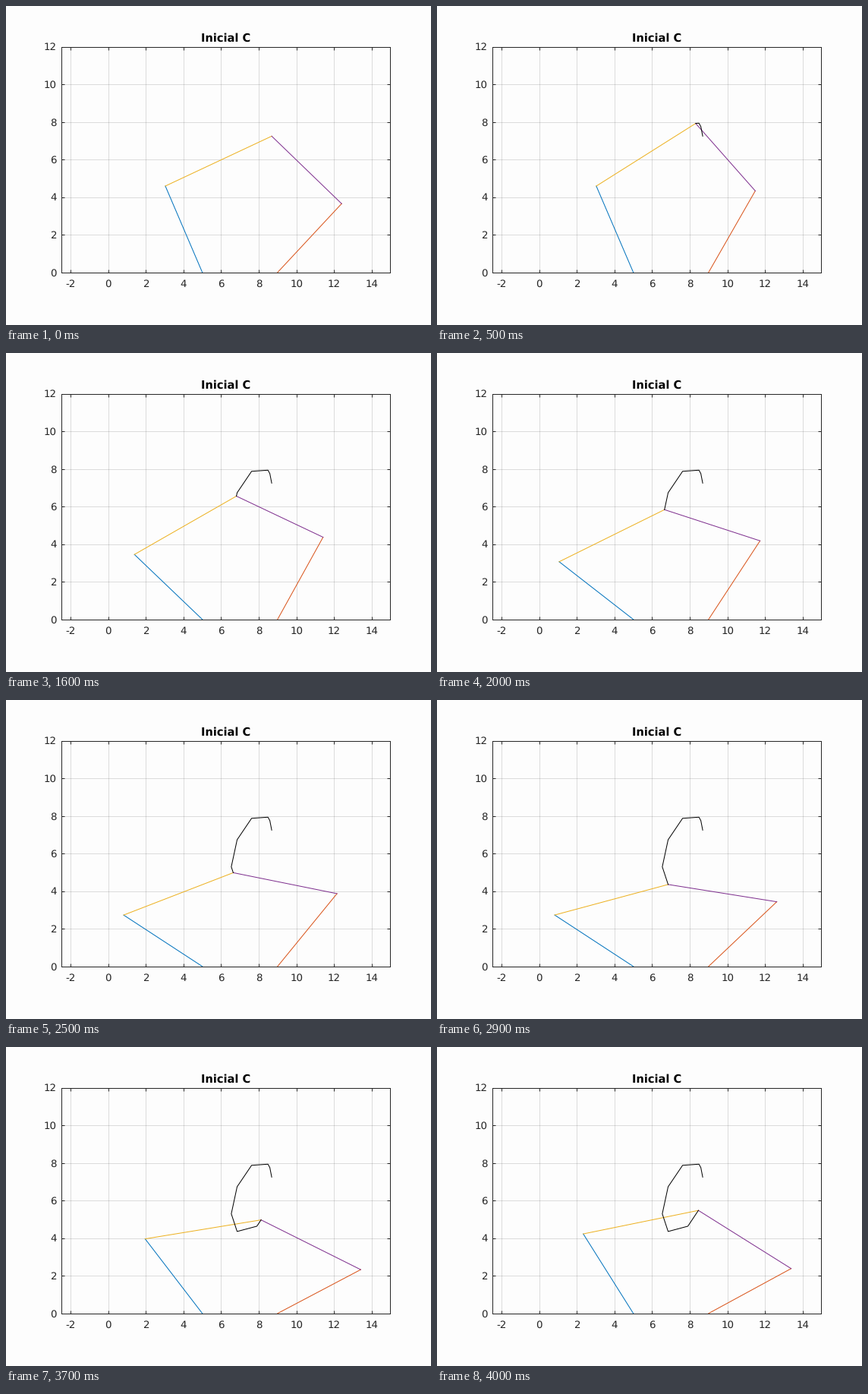
A matplotlib script that plays this animation: 560x420 px, repeating every 4.1 s.

```python
import numpy as np
import matplotlib.pyplot as plt
from matplotlib.animation import FuncAnimation

W, H, DPI = 560, 420, 100
LEFT, RIGHT, TOP, BOTTOM = 72.95, 506.4, 53.8, 350.8
PX = 72 / DPI  # one pixel in points
FRAMES, INTERVAL = 41, 100
INK = "#262626"
BACK = "#fdfdfd"

# Five-bar arm: two ground pivots and cranks of equal length
BASE_L, BASE_R = np.array([5.0, 0.0]), np.array([9.0, 0.0])
CRANK, COUPLER = 5.0, 6.25

# The right crank is steered by a slightly different virtual arm,
# so the right coupler stretches as the tip moves
STEER_BASE, STEER_CRANK, STEER_COUPLER = np.array([9.81, 0.0]), 3.53, 5.85

# Corners of the letter drawn by the tip: time step, x, y
PATH = np.array([
    (0, 8.69, 7.25), (3, 8.59, 7.76), (4, 8.49, 7.94),
    (9, 7.62, 7.88), (15, 6.85, 6.74), (23, 6.54, 5.30),
    (29, 6.85, 4.36), (35, 7.90, 4.64), (40, 8.46, 5.48),
])

plt.rcParams["font.family"] = "DejaVu Sans"
plt.rcParams["text.hinting"] = "none"
fig = plt.figure(figsize=(W / DPI, H / DPI), dpi=DPI, facecolor=BACK)
ax = fig.add_axes([LEFT / W, 1 - BOTTOM / H,
                   (RIGHT - LEFT) / W, (BOTTOM - TOP) / H], facecolor=BACK)
ax.set(xlim=(-2.5, 15), ylim=(0, 12),
       xticks=range(-2, 15, 2), yticks=range(0, 13, 2))
ax.tick_params(direction="in", length=4 * PX, width=PX, color=INK,
               top=True, right=True, labelbottom=False, labelleft=False)
ax.grid(color=INK, alpha=0.15, linewidth=PX)
ax.set_axisbelow(True)
for spine in ax.spines.values():
    spine.set(color=INK, linewidth=PX)


def label(x, y, text, size=13.33, **style):
    """Text with its baseline at a pixel position of the stage."""
    style = {"color": INK, "ha": "center", **style}
    fig.text(x / W, 1 - y / H, text, fontsize=size * PX,
             va="baseline", **style)


for v in range(-2, 15, 2):
    label(LEFT + (v + 2.5) / 17.5 * (RIGHT - LEFT), 370, str(v))
for v in range(0, 13, 2):
    y = BOTTOM - v / 12 * (BOTTOM - TOP)
    label(67, y + 4.6, str(v), ha="right")
label(290, 47, "Inicial C", 14.67, color="black", weight="bold")


def stroke(color):
    return ax.plot([], [], color=color, linewidth=PX)[0]


crank_l = stroke("#0072bd")
crank_r = stroke("#d95319")
coupler_l = stroke("#edb120")
coupler_r = stroke("#7e2f8e")
trace = stroke("black")


def tip_at(step):
    return np.array([np.interp(step, PATH[:, 0], PATH[:, k]) for k in (1, 2)])


def crank_angle(base, tip, crank, coupler, side):
    """Angle of a crank whose coupler reaches the tip (law of cosines)."""
    dx, dy = tip - base
    reach = np.hypot(dx, dy)
    bend = np.arccos((crank**2 + reach**2 - coupler**2) / (2 * crank * reach))
    return np.arctan2(dy, dx) + side * bend


def elbow(base, angle):
    return base + CRANK * np.array([np.cos(angle), np.sin(angle)])


def join(line, *points):
    line.set_data(*np.array(points).T)


def draw(step):
    tip = tip_at(step)
    left = elbow(BASE_L, crank_angle(BASE_L, tip, CRANK, COUPLER, 1))
    right = elbow(BASE_R, crank_angle(STEER_BASE, tip, STEER_CRANK,
                                      STEER_COUPLER, -1))
    join(crank_l, BASE_L, left)
    join(crank_r, BASE_R, right)
    join(coupler_l, left, tip)
    join(coupler_r, right, tip)
    join(trace, *PATH[PATH[:, 0] < step, 1:], tip)
    return crank_l, crank_r, coupler_l, coupler_r, trace


anim = FuncAnimation(fig, draw, frames=FRAMES, interval=INTERVAL,
                     repeat=True, repeat_delay=0)
plt.show()
```
